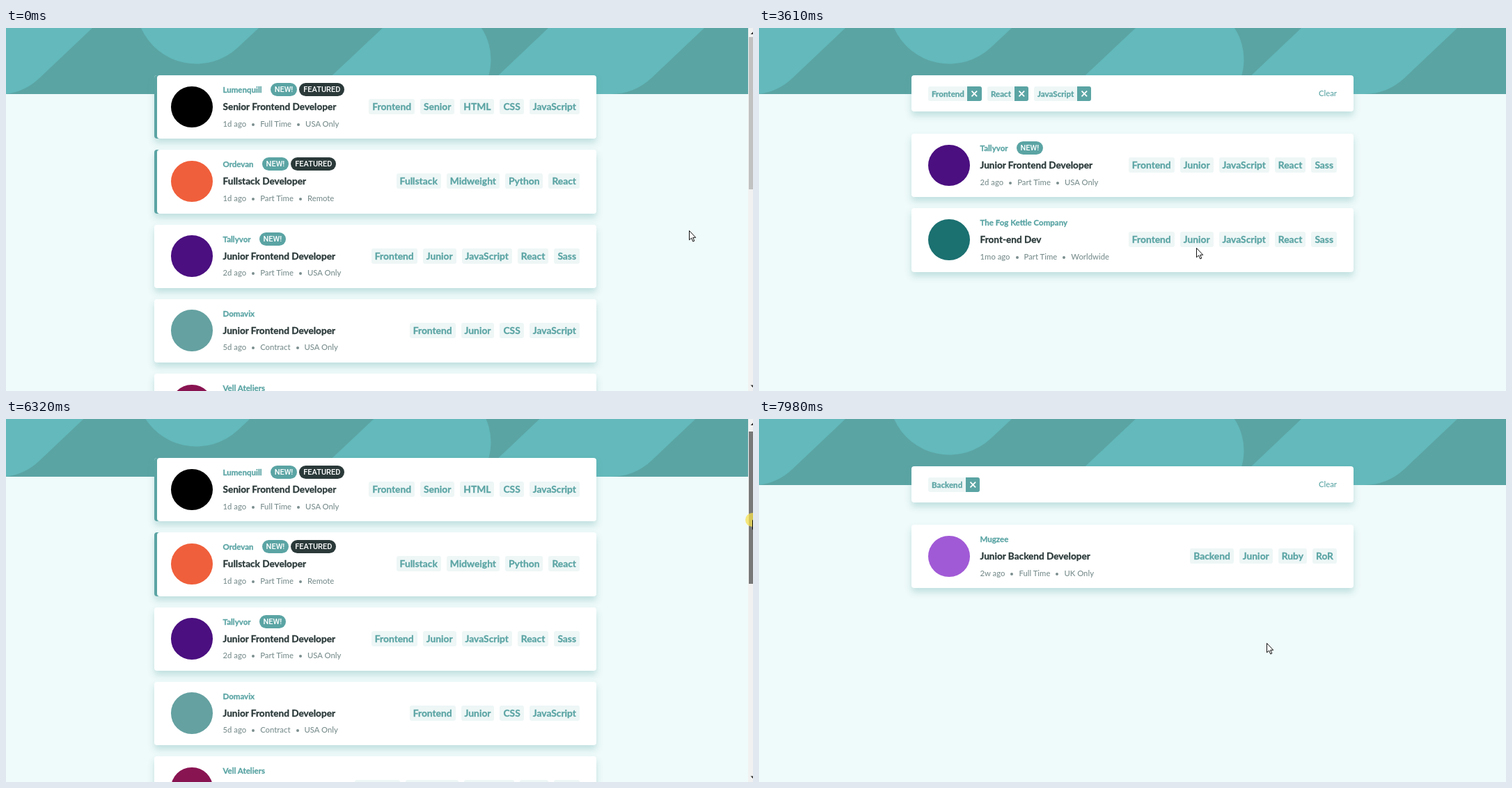
Animation of 1073x522 px, one loop 8 s. Source, as an HTML page:

```html
<!DOCTYPE html>
<html lang="en">
<head>
<meta charset="utf-8">
<title>Job listings</title>
<style>
  html, body { margin: 0; width: 100%; height: 100%; overflow: hidden; background: #effafa; }
  body { font-family: Lato, sans-serif; color: #2b3939; }
  #stage { position: relative; width: 1073px; height: 522px; overflow: hidden; background: #effafa; white-space: nowrap; }
  #stage, #stage * { box-sizing: border-box; }
  #view, #header, .page, .card, .bar, .avatar, .firm, .role, .meta, .chips, .clear,
  #scrollbar, #thumb, #pointer { position: absolute; left: 0; top: 0; }
  #header { display: block; }
  .card, .bar {
    left: 213px; width: 635px; background: #fff; border-radius: 4px;
    box-shadow: 0 6px 10px rgba(91, 164, 164, .3);
  }
  .card { height: 91.25px; }
  .bar { top: 68px; height: 52px; padding: 15.5px 24px; }
  .featured { box-shadow: inset 4px 0 #5ba4a4, 0 6px 10px rgba(91, 164, 164, .3); }
  .avatar { left: 24px; top: 15.5px; width: 59.5px; height: 59.5px; border-radius: 50%; }
  .firm, .role, .meta { left: 98.5px; height: 20px; line-height: 20px; display: flex; }
  .firm, .role, .chip, .tag { font-weight: 700; -webkit-text-stroke: .3px currentColor; }
  .firm { top: 11px; font-size: 11.5px; color: #5ba4a4; }
  .role { top: 35px; font-size: 13.6px; }
  .meta { top: 59.5px; font-size: 11.3px; font-weight: 500; color: #7b8e8e; }
  .meta i { width: 4px; height: 4px; margin: 9px 8px 0; border-radius: 50%; background: #7b8e8e; }
  .pill {
    height: 19px; margin-left: 12px; padding: 0 6px; border-radius: 10px;
    font: 500 11px/19px Roboto, sans-serif; color: #fff; background: #5ba4a4; -webkit-text-stroke: 0;
  }
  .dark { margin-left: 3px; background: #2b3939; }
  .chips { left: auto; right: 24px; top: 34px; }
  .chips, .bar { display: flex; gap: 8px; }
  .chip { height: 22px; line-height: 22px; padding: 0 5px; border-radius: 3px; font-size: 13.8px; color: #5ba4a4; background: #eef6f6; }
  .chip.hover { color: #89b8be; background: #c8e2e2; }
  .tag {
    display: flex; gap: 4.5px; height: 21px; line-height: 21px; padding-left: 5px; border-radius: 3px; overflow: hidden;
    font-size: 11.6px; color: #5ba4a4; background: #eef6f6;
  }
  .tag svg { background: #5ba4a4; }
  .clear { left: auto; right: 24px; top: 19px; line-height: 14px; font-size: 11.3px; font-weight: 500; color: #5ba4a4; }
  #scrollbar { left: 1066px; width: 7px; height: 522px; background: #f1f1f1; }
  #scrollbar svg { position: absolute; }
  #thumb { left: 1px; width: 6px; }
  #pointer { overflow: visible; pointer-events: none; }
</style>
</head>
<body>
<div id="stage">
  <div id="view">
    <svg id="header" width="1073" height="95">
      <rect width="1073" height="95" fill="#5ba4a4"/>
      <g fill="#63b9bb">
        <path d="M0 0H124L48 72A86 86 0 0 1 0 95Z"/>
        <path d="M194 0A87 87 0 0 0 333 28L363 0Z"/>
        <path d="M541 0H683A83 83 0 0 1 680 95H440Z"/>
        <path d="M779 0H1003L927 72A86 86 0 0 1 868 95H679Z"/>
      </g>
    </svg>
  </div>
  <div id="scrollbar">
    <div id="thumb"></div>
    <svg width="7" height="522"><path d="M3.5 9L7 5.5V9ZM3.5 513.5L7 517V513.5Z" fill="#333"/></svg>
  </div>
  <svg id="pointer" width="1" height="1">
    <circle id="press" r="10" fill="#f5e04f" fill-opacity=".75"/>
    <path id="arrow" d="M.5.5V13.8L3.6 11L5.8 16L7.8 15.1L5.7 10.3H9.7Z" fill="#fff" stroke="#111"/>
    <path id="hand" d="M-1.5 10V1Q-1.5 -.7 0 -.7T1.5 1V6Q3.4 5 4.3 6.7Q6.2 6 6.8 7.6Q9 7.2 9 9.4V12.5Q9 15 7.3 18H-.4Q-2 14.8-4.6 11.8Q-5.2 9.8-3.5 9.3Q-2.4 9-1.5 10ZM1.5 6V9.5M4.3 6.7V10M6.8 7.6V10.3"
      fill="#fff" stroke="#111" stroke-linejoin="round"/>
  </svg>
</div>
<script>
const LOOP = 8000, VIEW_HEIGHT = 522, CARD_PITCH = 107.25, PAGE_END = 150;
const TRACK_TOP = 13, TRACK_HEIGHT = 496;
const GLIDE = 400, CLICK = 80;
const drag = { press: 6200, start: 6287, end: 6600, release: 6680, distance: 361 };
const $ = id => document.getElementById(id);

const jobs = [
  { firm: 'Lumenquill', color: '#000', role: 'Senior Frontend Developer', meta: '1d ago|Full Time|USA Only', skills: 'Frontend Senior HTML CSS JavaScript', pills: 'NEW! FEATURED' },
  { firm: 'Ordevan', color: '#f05f3b', role: 'Fullstack Developer', meta: '1d ago|Part Time|Remote', skills: 'Fullstack Midweight Python React', pills: 'NEW! FEATURED' },
  { firm: 'Tallyvor', color: '#4b0f80', role: 'Junior Frontend Developer', meta: '2d ago|Part Time|USA Only', skills: 'Frontend Junior JavaScript React Sass', pills: 'NEW!' },
  { firm: 'Domavix', color: '#65a1a1', role: 'Junior Frontend Developer', meta: '5d ago|Contract|USA Only', skills: 'Frontend Junior CSS JavaScript' },
  { firm: 'Vell Ateliers', color: '#891452', role: 'Software Engineer', meta: '1w ago|Full Time|Worldwide', skills: 'Fullstack Midweight JavaScript Ruby Sass' },
  { firm: 'Mugzee', color: '#a15ad6', role: 'Junior Backend Developer', meta: '2w ago|Full Time|UK Only', skills: 'Backend Junior Ruby RoR' },
  { firm: 'Brevino', color: '#18a7db', role: 'Junior Developer', meta: '2w ago|Full Time|Worldwide', skills: 'Frontend Junior HTML JavaScript Sass' },
  { firm: 'Covrel', color: '#3e3446', role: 'Junior Frontend Developer', meta: '2w ago|Full Time|USA Only', skills: 'Frontend Junior JavaScript Vue Sass' },
  { firm: 'The Fog Kettle Company', color: '#1b7070', role: 'Front-end Dev', meta: '1mo ago|Part Time|Worldwide', skills: 'Frontend Junior JavaScript React Sass' }
];

const states = [
  { at: 0, filters: '' },
  { at: 500, filters: 'Frontend' },
  { at: 1660, filters: 'Frontend React' },
  { at: 2660, filters: 'Frontend React JavaScript' },
  { at: 3890, filters: 'Frontend React JavaScript Junior' },
  { at: 5360, filters: '' },
  { at: 7530, filters: 'Backend' }
];

// Pointer stops: arrival time, x, y
const stops = [
  [0, 981, 291], [430, 565, 111], [1180, 832, 401], [1520, 766, 305], [2380, 716, 309],
  [3610, 628, 316], [3800, 630, 309], [4920, 811, 105], [5260, 815, 95], [5750, 985, 138],
  [6320, 1072, 145], [6600, 1058, 269], [7440, 663, 281], [7970, 729, 322]
];

const words = text => text ? text.split(' ') : [];
const wrap = (list, className) => list.map(s => `<div class="${className}">${s}</div>`).join('');
const cross = '<svg width="20.5" height="21"><path d="M6.5 6.7l7.6 7.6m0-7.6l-7.6 7.6" stroke="#fff" stroke-width="1.8"/></svg>';

function cardHtml({ firm, color, role, meta, skills, pills }, top) {
  const [isNew, featured] = words(pills);
  return `<div class="card ${featured ? 'featured' : ''}" style="top:${top}px">
    <div class="avatar" style="background:${color}"></div>
    <div class="firm">${firm}${isNew ? wrap([isNew], 'pill') : ''}${featured ? wrap([featured], 'pill dark') : ''}</div>
    <div class="role">${role}</div>
    <div class="meta">${meta.split('|').join('<i></i>')}</div>
    <div class="chips">${wrap(words(skills), 'chip')}</div>
  </div>`;
}

function buildPage(state) {
  const filters = words(state.filters);
  const matches = jobs.filter(job => filters.every(f => words(job.skills).includes(f)));
  const top = filters.length ? 152 : 68;
  const page = document.createElement('div');
  page.className = 'page';
  page.innerHTML = matches.map((job, i) => cardHtml(job, top + i * CARD_PITCH)).join('');
  if (filters.length) {
    const tags = wrap(filters.map(f => f + cross), 'tag');
    page.insertAdjacentHTML('afterbegin', `<div class="bar">${tags}<div class="clear">Clear</div></div>`);
  }
  const height = top + matches.length * CARD_PITCH + PAGE_END;
  const scrolls = height > VIEW_HEIGHT;
  page.style.left = scrolls ? '0' : '6px';
  $('view').append(page);
  return { page, scrolls, thumbScale: TRACK_HEIGHT / height };
}

const pages = states.map(buildPage);

function ease(from, to, t) {
  const u = Math.min(1, Math.max(0, (t - from) / (to - from)));
  return u * u * (3 - 2 * u);
}

function pointerAt(t) {
  const next = stops.findIndex(stop => stop[0] > t);
  if (next < 0) return stops.at(-1).slice(1);
  const [left, x0, y0] = stops[next - 1];
  const [arrive, x1, y1] = stops[next];
  const u = ease(Math.max(left, arrive - GLIDE), arrive, t);
  return [x0 + (x1 - x0) * u, y0 + (y1 - y0) * u].map(Math.round);
}

const show = (el, on) => { el.style.display = on ? '' : 'none'; };
let hovered = null;

function render(t) {
  const current = states.findLastIndex(s => t >= s.at);
  const { scrolls, thumbScale } = pages[current];
  const [x, y] = pointerAt(t);
  const scroll = current === states.length - 1 ? 0 : drag.distance * ease(drag.start, drag.end, t);
  const dragging = t > drag.press && t < drag.release;
  const clicking = states.some(s => t < s.at && t >= s.at - CLICK);

  pages.forEach(({ page }, i) => show(page, i === current));
  $('view').style.transform = `translateY(${-Math.round(scroll)}px)`;
  show($('scrollbar'), scrolls);
  Object.assign($('thumb').style, {
    top: TRACK_TOP + scroll * thumbScale + 'px',
    height: VIEW_HEIGHT * thumbScale + 'px',
    background: dragging ? '#787878' : '#c1c1c1'
  });

  hovered?.classList.remove('hover');
  hovered = document.elementFromPoint(x, y)?.closest('.chip, .clear') ?? null;
  hovered?.classList.add('hover');
  show($('hand'), hovered);
  show($('arrow'), !hovered);
  show($('press'), dragging || clicking);
  $('pointer').style.transform = `translate(${x}px, ${y}px)`;
}

const begin = performance.now();
function tick() {
  render((performance.now() - begin) % LOOP);
  requestAnimationFrame(tick);
}
tick();
</script>
</body>
</html>
```
